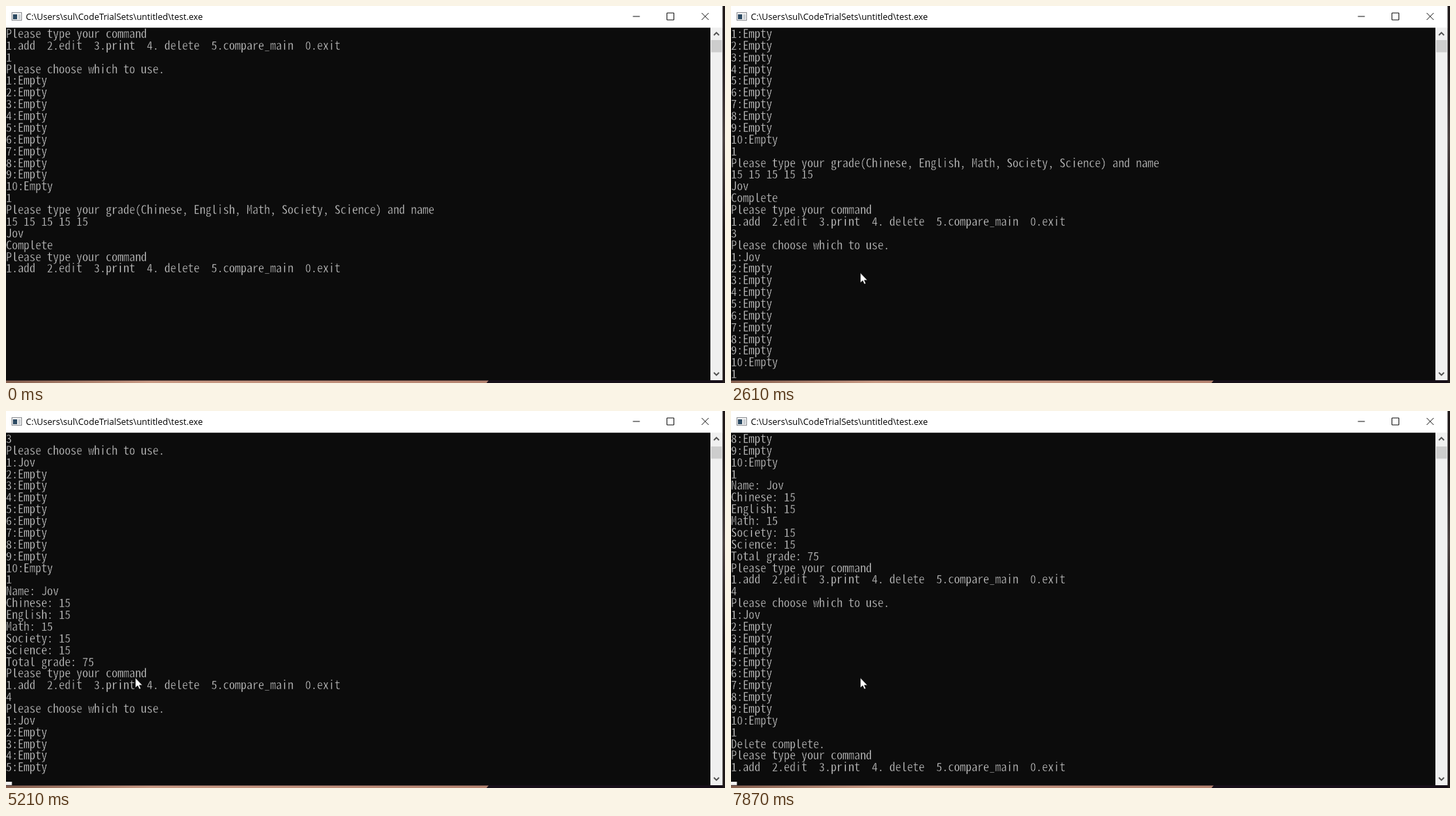
An HTML page for the animation above (8 s loop, 1034 px wide and 542 px high).

```html
<!DOCTYPE html>
<html lang="en">
<head>
<meta charset="utf-8">
<title>Console</title>
<style>
  html, body { margin: 0; width: 100%; height: 100%; overflow: hidden; background: #0c0c0c; }
  svg { display: block; width: 1034px; height: 542px; }
  /* the dark outline thins the letters */
  #rows text { fill: #ccc; stroke: #0c0c0c; stroke-width: .35; white-space: pre; }
  .title { font: 12.55px "Open Sans", "Noto Sans", sans-serif; fill: #000; }
  .line { fill: none; stroke: #111; }
  .chevron { fill: none; stroke: #505050; stroke-width: 1.8; }
</style>
</head>
<body>
<svg viewBox="0 0 1034 542">
  <defs>
    <linearGradient id="desk">
      <stop offset="0" stop-color="#86604f"/>
      <stop offset=".3" stop-color="#c99a85"/>
      <stop offset="1" stop-color="#b58370"/>
    </linearGradient>
    <linearGradient id="side" x2="0" y2="1">
      <stop offset=".12" stop-color="#1f1819"/>
      <stop offset=".35" stop-color="#4a4040"/>
      <stop offset=".6" stop-color="#1f1819"/>
    </linearGradient>
  </defs>
  <rect width="1034" height="542" fill="#0c0c0c"/>

  <!-- desktop behind the window -->
  <rect y="538" width="1034" height="4" fill="#170f19"/>
  <path d="M0 538.5H694L691 542H0Z" fill="url(#desk)"/>
  <rect x="1030.5" width="3.5" height="542" fill="url(#side)"/>

  <!-- title bar -->
  <rect width="1030.5" height="31.2" fill="#fff"/>
  <rect x="8.5" y="9.5" width="14" height="11" fill="#f4f4f4" stroke="#8c8f94"/>
  <rect x="10" y="12" width="6" height="7" fill="#2c4a63"/>
  <rect x="17.5" y="12" width="3.5" height="7" fill="#c9ced3"/>
  <text class="title" x="28.5" y="19.5">C:\Users\sul\CodeTrialSets\untitled\test.exe</text>
  <path class="line" d="M901.5 15h10M950.5 10h10v10h-10zM1000.5 10l10 10m0-10l-10 10"/>

  <!-- scroll bar -->
  <rect x="1013" y="31" width="17.5" height="507" fill="#f0f0f0"/>
  <path class="chevron" d="M1018 42l3.7-3.7 3.7 3.7M1018 527l3.7 3.7 3.7-3.7"/>
  <rect id="thumb" x="1014" width="15.5" height="17.5" fill="#cdcdcd"/>

  <g id="rows"></g>
  <rect id="caret" width="8.5" height="4.8" fill="#f2f2f2"/>
  <path id="mouse" d="M0 0V14.6L3.4 11.5L5.7 16.6L8 15.6L5.8 10.7H10.3Z" fill="#fff" stroke="#000" stroke-width=".7"/>
</svg>
<script>
const LOOP = 8000, ROWS = 30, TOP = 31, ROW_H = 16.87, CELL = 8.44;
const BLINK = 528, WAKE = 470, PAINT = 40;
const NAME = 'Jov';
const FONT = '"Noto Sans Mono CJK TC", "Noto Sans Mono CJK SC", "Noto Sans Mono CJK JP", "Noto Sans Mono", "Liberation Mono", monospace';
const $ = id => document.getElementById(id);

const menu = ['Please type your command',
  '1.add  2.edit  3.print  4. delete  5.compare_main  0.exit'];
const slots = first => ['Please choose which to use.',
  ...Array.from({ length: 10 }, (_, i) => `${i + 1}:${i ? 'Empty' : first}`)];
const subjects = ['Chinese', 'English', 'Math', 'Society', 'Science'];

const opening = [
  ...menu, '1', ...slots('Empty'), '1',
  `Please type your grade(${subjects.join(', ')}) and name`,
  subjects.map(() => 15).join(' '), NAME, 'Complete', ...menu
];
const report = [`Name: ${NAME}`, ...subjects.map(s => `${s}: 15`),
  `Total grade: ${15 * subjects.length}`];

// drawn: lines in the first paint; blank: lines scrolled in but still empty
const turns = [
  { key: 1300, enter: 1730, input: '3', out: slots(NAME), drawn: 0, blank: 11 },
  { key: 2560, enter: 3120, input: '1', out: [...report, ...menu] },
  { key: 4930, enter: 5210, input: '4', out: slots(NAME), drawn: 6, blank: 0 },
  { key: 6140, enter: 6380, input: '1', out: ['Delete complete.', ...menu] }
];

function consoleAt(t) {
  const lines = [...opening];
  let since = 0, col = 0, blank = 0, typed = false;
  for (const turn of turns) {
    if (t < turn.key) break;
    lines.push(turn.input);
    [since, col, typed] = [turn.key, 1, true];
    if (t < turn.enter) break;
    col = 0;
    if ('drawn' in turn && t < turn.enter + PAINT) {
      lines.push(...turn.out.slice(0, turn.drawn));
      blank = turn.blank;
      break;
    }
    lines.push(...turn.out);
    [since, typed] = [turn.enter, false];
  }
  const row = lines.length + blank - col;
  return { lines, row, col, top: Math.max(0, row - ROWS + 1), lit: caretLit(t, since, typed) };
}

// the caret lights up on every change; after output it skips one blink
function caretLit(t, since, typed) {
  const tick = time => Math.floor((time - WAKE) / BLINK);
  const n = tick(t) - tick(since);
  return n ? n % 2 === (typed ? 0 : 1) : since > 0;
}

// choose the size at which one character fills one cell
const pen = document.createElement('canvas').getContext('2d');
pen.font = `300 100px ${FONT}`;
const size = CELL * 100 / pen.measureText('0').width;

const rows = Array.from({ length: ROWS }, (_, i) => {
  const row = document.createElementNS('http://www.w3.org/2000/svg', 'text');
  row.setAttribute('y', TOP + i * ROW_H + 15);
  row.style.font = `300 ${size}px ${FONT}`;
  return $('rows').appendChild(row);
});

function place(id, x, y, visible = true) {
  $(id).setAttribute('transform', `translate(${x} ${y})`);
  $(id).style.display = visible ? '' : 'none';
}

function draw(t) {
  const { lines, row, col, top, lit } = consoleAt(t);
  rows.forEach((el, i) => {
    const text = lines[top + i] ?? '';
    if (el.textContent !== text) el.textContent = text;
  });
  place('caret', col * CELL, TOP + (row - top) * ROW_H + 12.8, lit);
  place('thumb', 0, 49 + Math.round(top / 13));

  const left = Math.max(0, 1 - (t - WAKE) / 180) ** 2;
  place('mouse', 186 + 5 * left, 383.5 + 85 * left, t >= WAKE);
}

const start = performance.now();
function tick() {
  draw((performance.now() - start) % LOOP);
  requestAnimationFrame(tick);
}
tick();
</script>
</body>
</html>
```
